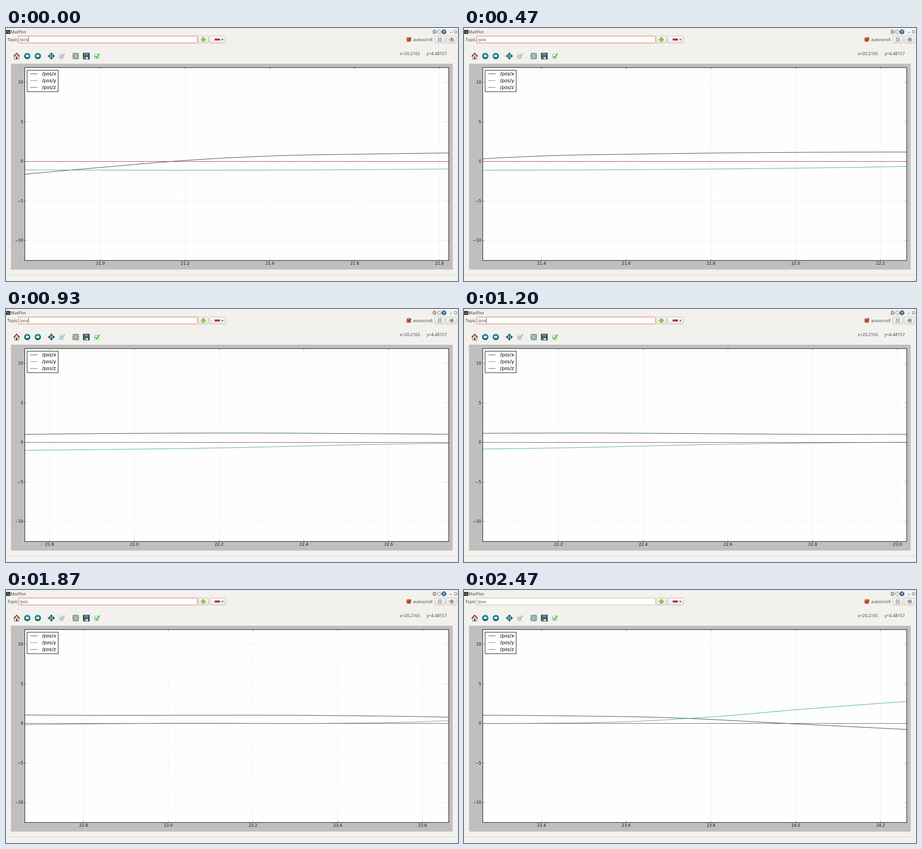
An HTML page that plays this animation: 999x560 px, repeating every 2.54 s.

```html
<!DOCTYPE html>
<html lang="en">
<head>
<meta charset="utf-8">
<title>MatPlot</title>
<style>
html, body { margin: 0; width: 100%; height: 100%; overflow: hidden; background: #f2f1ed; }
svg { display: block; width: 999px; height: 560px; }
text { font: 8.75px "DejaVu Sans", sans-serif; fill: #111; }
.ui text { font: 9.4px "Open Sans", "Noto Sans", sans-serif; fill: #3a3a3a; }
.key text { font-size: 10.3px; fill: #000; }
.btn { fill: url(#btn); stroke: #b9b6b0; }
.grid { stroke: #b4b4b4; stroke-width: .7; stroke-dasharray: .8 2.4; }
.mark { stroke: #222; stroke-width: .6; }
.frame { stroke: #111; stroke-width: 1.05; }
.line { fill: none; stroke-width: .9; }
.x { stroke: #222; }
.y { stroke: #259a8d; }
.z { stroke: #83304a; }
</style>
</head>
<body>
<svg viewBox="0 0 999 560">
  <defs>
    <linearGradient id="btn" x2="0" y2="1">
      <stop stop-color="#fbfaf9"/><stop offset="1" stop-color="#e9e7e3"/>
    </linearGradient>
    <radialGradient id="disc" cy=".3">
      <stop stop-color="#3fa3b0"/><stop offset="1" stop-color="#0d6c7b"/>
    </radialGradient>
    <g id="back">
      <circle r="7" fill="url(#disc)"/>
      <path d="M-4 0L0 -3.6V-1.4H4V1.4H0V3.6z" fill="#fff"/>
    </g>
    <path id="arm" d="M0 0V-5M0 -7l2.5 3.2h-5z" fill="#135a6b" stroke="#135a6b" stroke-width="1.4"/>
    <path id="tip" d="M0 -7.8l2 2h-4z" fill="#6f9d2f"/>
    <clipPath id="area"><rect x="42" y="88" width="936.5" height="426.5"/></clipPath>
  </defs>
  <rect width="999" height="560" fill="#f2f1ed"/>
  <path d="M0 546H999" stroke="#d3d2ce"/>

  <g class="ui">
    <!-- title bar -->
    <rect y="4.5" width="9.5" height="8.5" rx="1" fill="#232b2b"/>
    <path d="M0 9H3L4 7L5.5 11L6.5 9H9.5" fill="none" stroke="#b9d6cc" stroke-width=".8"/>
    <text x="10" y="12">MatPlot</text>
    <circle cx="947" cy="8.5" r="4.6" fill="#dcdad2" stroke="#aaa8a0" stroke-width=".7"/>
    <text x="943.8" y="12">D</text>
    <circle cx="957.5" cy="8.5" r="3.6" fill="none" stroke="#b7bbb9" stroke-width="2"/>
    <circle cx="957.5" cy="8.5" r="4.7" fill="none" stroke="#b7bbb9" stroke-dasharray="1.8 1.9"/>
    <circle cx="968" cy="8.5" r="5" fill="#2f6a9c" stroke="#234f78" stroke-width=".6"/>
    <text x="966" y="12" style="fill:#fff;font-weight:700;font-size:9px">?</text>
    <path d="M981.5 9.7H985" stroke="#444" stroke-width="1.1"/>
    <text x="990" y="12">O</text>

    <!-- topic row -->
    <text x="3" y="29.2">Topic</text>
    <rect id="field" x="27.5" y="17.8" width="395.5" height="15.4" rx="2" fill="#fff"/>
    <text x="29.5" y="29.2">/pos</text>
    <path id="caret" d="M49.5 20V31" stroke="#222" stroke-width=".9"/>
    <g id="buttons"></g>
    <path d="M436.2 20.5v10M431.2 25.5h10" stroke="#5f9c12" stroke-width="4.2"/>
    <path d="M436.2 21.2v8.6M431.9 25.5h8.6" stroke="#93cf35" stroke-width="2.8"/>
    <rect x="461.5" y="23.7" width="11" height="3.5" rx=".6" fill="#d8203c" stroke="#a31630" stroke-width=".7"/>
    <path d="M475.6 24.3h5.4l-2.7 4z" fill="#6d6b68"/>
    <rect x="885.8" y="21" width="9" height="9" rx="1.5" fill="#df6541" stroke="#a84a30" stroke-width=".8"/>
    <path d="M887.7 25L890 27.6L895.2 21" fill="none" stroke="#4b2b22" stroke-width="1.4"/>
    <text x="899.8" y="29.2">autoscroll</text>
    <path d="M955 21.2h2.6v8.4H955zM960 21.2h2.6v8.4H960z" fill="#d8d7d3" stroke="#808080" stroke-width=".8"/>
    <path d="M979 25.5L982.3 22H988.6V29H982.3z" fill="#e4e3e0" stroke="#555" stroke-width=".9"/>
    <path d="M983.2 23.8l3.4 3.4m0-3.4l-3.4 3.4" stroke="#333" stroke-width="1.2"/>

    <!-- plot toolbar -->
    <path d="M18.7 62H28.5V69H18.7z" fill="#efe6da" stroke="#6d4a3c" stroke-width=".8"/>
    <path d="M22 64h3.2v5H22z" fill="#5b3a2e"/>
    <path d="M17 62.8L23.6 56L30.2 62.8" fill="none" stroke="#9c2222" stroke-width="2.2"/>
    <use href="#back" x="47" y="62"/>
    <use href="#back" transform="translate(70.3 62) scale(-1 1)"/>
    <g id="move" transform="translate(100.3 62)"></g>
    <rect x="117.5" y="57" width="10" height="11" fill="#e6eae8" stroke="#c0cbcb" stroke-width=".7"/>
    <path d="M125 61.5L130 56.8" stroke="#cda678" stroke-width="2"/>
    <circle cx="122.6" cy="63.6" r="3.6" fill="#b5dce2" stroke="#86b4bb"/>
    <rect x="148.3" y="56.3" width="11.6" height="11.6" fill="#e2ead7" stroke="#274f55" stroke-width="1.1"/>
    <rect x="151" y="59" width="6.2" height="6.2" fill="#fff" stroke="#1d4a58"/>
    <path d="M151.5 64l2-2.5 1.5 1.3 2-2.3" fill="none" stroke="#1d4a58" stroke-width=".8"/>
    <g id="fit" transform="translate(154.1 62)"></g>
    <path d="M170.5 55.2H184.5V69.2H172L170.5 67.7z" fill="#2f4f5c" stroke="#1d343e" stroke-width=".7"/>
    <rect x="173" y="55.8" width="9" height="5.4" fill="#5f8d9b"/>
    <rect x="174" y="64" width="7.2" height="5" fill="#dfe4e4"/>
    <rect x="175" y="65" width="2" height="3.4" fill="#2f4f5c"/>
    <rect x="195.7" y="58.2" width="9.4" height="9.4" rx="1" fill="#fff" stroke="#82a883"/>
    <path d="M197 61.7L200.3 65.8L206.8 56.3" fill="none" stroke="#1bd01b" stroke-width="2.2"/>
    <text x="870.3" y="59.8">x=20.2165</text>
    <text x="929.6" y="59.8">y=4.48157</text>
  </g>

  <rect x="11" y="79" width="976.3" height="455.7" fill="#bfbfbf"/>
  <rect x="42" y="88" width="936.5" height="426.5" fill="#fefefd"/>
  <g id="axes"></g>
  <g clip-path="url(#area)"><g id="curves"></g></g>
  <rect class="frame" x="41.5" y="87.6" width="937" height="426.9" fill="none"/>
  <g class="key" id="key">
    <rect class="frame" x="46.6" y="93.4" width="68.7" height="47.6" fill="#fff"/>
  </g>
</svg>
<script>
const LEFT = 42, RIGHT = 978.5, TOP = 88, BOTTOM = 514.5;
const ZERO = 295.4, UNIT = 17.52, SECOND = 936.7;
const START = 20.822, SPAN = 3.46, LOOP = 2540, STEP = 200 / 3;
const $ = id => document.getElementById(id);
const stageY = v => ZERO - v * UNIT;

function add(parent, tag, attrs, text = '') {
  const el = document.createElementNS('http://www.w3.org/2000/svg', tag);
  for (const name in attrs) el.setAttribute(name, attrs[name]);
  el.textContent = text;
  return parent.appendChild(el);
}

// Smooth function through a few [time, value] points
function spline(pts) {
  const rise = i => (pts[i + 1][1] - pts[i][1]) / (pts[i + 1][0] - pts[i][0]);
  const last = pts.length - 1;
  const slopes = pts.map(([t], i) => {
    if (i === 0) return rise(0);
    if (i === last) return rise(last - 1);
    const before = t - pts[i - 1][0], after = pts[i + 1][0] - t;
    return (after * rise(i - 1) + before * rise(i)) / (before + after);
  });
  return t => {
    let i = 0;
    while (i < last - 1 && pts[i + 1][0] < t) i++;
    const [t0, a] = pts[i], [t1, b] = pts[i + 1];
    const h = t1 - t0, u = (t - t0) / h, v = 1 - u;
    return v * v * ((1 + 2 * u) * a + u * h * slopes[i])
      + u * u * ((1 + 2 * v) * b - v * h * slopes[i + 1]);
  };
}

const series = {
  x: spline([[20.7, -2.2], [21, -.76], [21.2, .13], [21.4, .69], [21.65, .95], [22.2, 1.19],
    [22.8, 1.03], [23.4, .99], [23.7, .73], [24, -.06], [24.3, -.86]]),
  y: spline([[20.7, -1.04], [21.2, -1.11], [21.8, -.96], [22.2, -.69], [22.6, -.22],
    [23, .015], [23.4, .02], [23.6, .22], [23.8, .82], [24, 1.73], [24.3, 2.94]]),
  z: () => 0,
};

Object.entries(series).forEach(([name, value], row) => {
  const points = [];
  for (let s = 0; s <= SPAN; s += 0.02) {
    points.push(`${(s * SECOND).toFixed(2)} ${stageY(value(START + s)).toFixed(2)}`);
  }
  add($('curves'), 'path', { class: 'line ' + name, d: 'M' + points.join('L') });
  const y = 101.5 + row * 15;
  add($('key'), 'path', { class: 'line ' + name, d: `M53.5 ${y}h16` });
  add($('key'), 'text', { x: 79.5, y: y + 3.5 }, '/pos/' + name);
});

for (const [x, width] of [[425.2, 22], [449.8, 35.2], [947.8, 22.2], [973, 22]]) {
  add($('buttons'), 'rect', { class: 'btn', x, y: 17.8, width, height: 15.4, rx: 2 });
}
for (let turn = 0; turn < 360; turn += 90) {
  add($('move'), 'use', { href: '#arm', transform: `rotate(${turn})` });
  add($('fit'), 'use', { href: '#tip', transform: `rotate(${turn})` });
}

for (let v = -10; v <= 10; v += 5) {
  const y = stageY(v);
  add($('axes'), 'path', { class: 'grid', d: `M${LEFT} ${y}H${RIGHT}` });
  add($('axes'), 'path', { class: 'mark', d: `M${LEFT} ${y}h3M${RIGHT} ${y}h-3` });
  add($('axes'), 'text', { x: 38.2, y: y + 2.7, 'text-anchor': 'end' }, String(v).replace('-', '\u2212'));
}

const ticks = Array.from({ length: 5 }, () => {
  const g = add($('axes'), 'g', {});
  add(g, 'path', { class: 'grid', d: `M0 ${BOTTOM}V${TOP}` });
  add(g, 'path', { class: 'mark', d: `M0 ${BOTTOM}v-3M0 ${TOP}v3` });
  return { g, label: add(g, 'text', { y: 524, 'text-anchor': 'middle' }) };
});

function draw(ms) {
  const t = Math.floor((ms % LOOP) / 10) * 10;
  const shot = Math.min(37, Math.floor((t + 3.4) / STEP));
  const shift = Math.floor((shot * 0.0665 + 0.0036) / 0.04) * 0.04;
  const from = START + shift, first = Math.ceil(from * 5);
  $('curves').setAttribute('transform', `translate(${(LEFT - shift * SECOND).toFixed(2)} 0)`);
  ticks.forEach(({ g, label }, i) => {
    const value = (first + i) / 5;
    g.setAttribute('transform', `translate(${(LEFT + (value - from) * SECOND).toFixed(2)} 0)`);
    label.textContent = value.toFixed(1);
  });
  const focused = t < 1930;
  const caretOn = focused && (t + 400) % 1200 < 600;
  $('caret').setAttribute('visibility', caretOn ? 'visible' : 'hidden');
  $('field').setAttribute('stroke', focused ? '#e2603f' : '#b5b2ac');
}

let origin;
function tick(now) {
  origin ??= now;
  draw(now - origin);
  requestAnimationFrame(tick);
}
draw(0);
requestAnimationFrame(tick);
</script>
</body>
</html>
```
